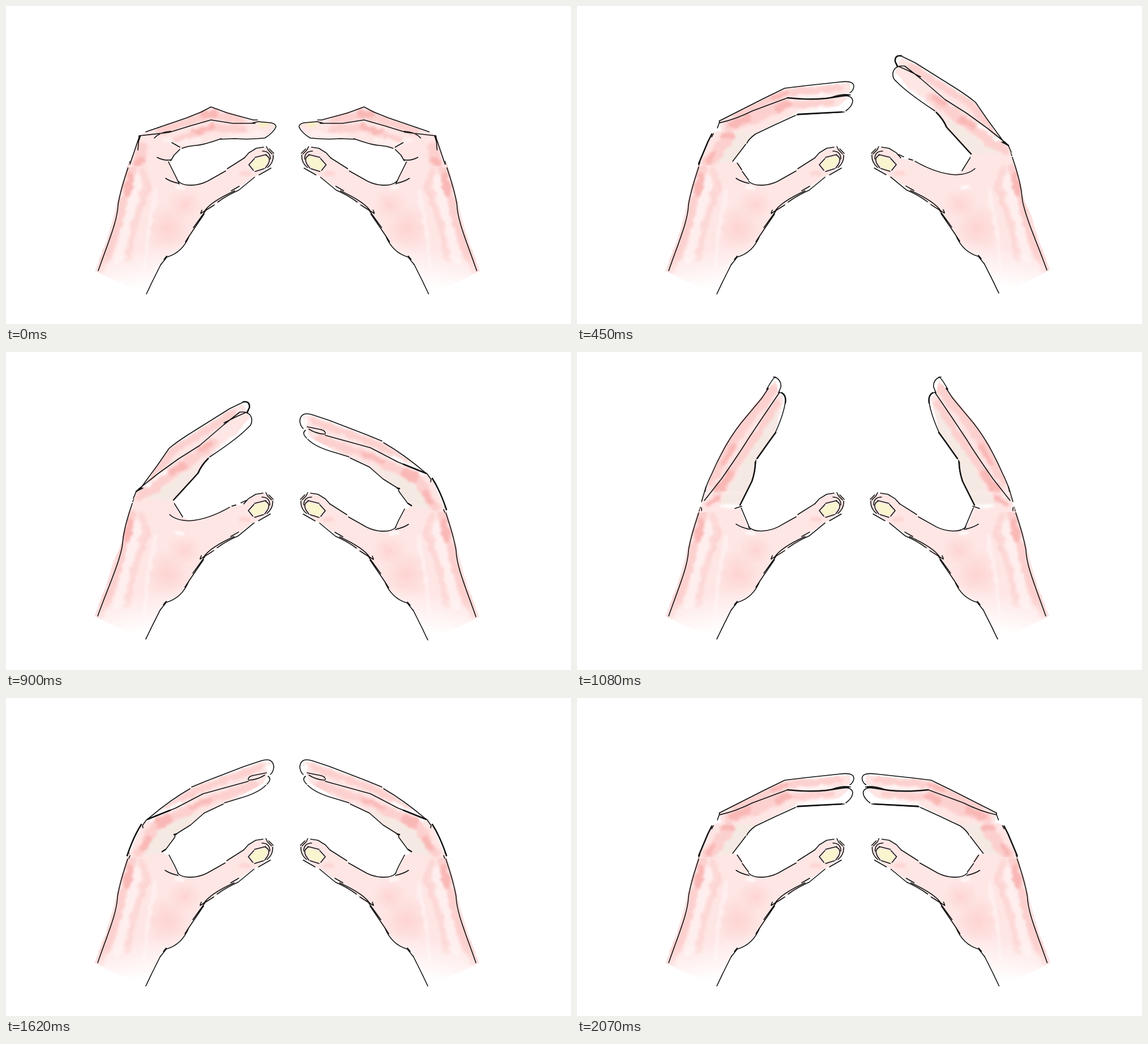
An HTML page for the animation above (2160 ms loop, 998 by 561 pixels).

```html
<!DOCTYPE html>
<html lang="en">
<head>
<meta charset="utf-8">
<title>Two hands</title>
<style>
html, body { margin: 0; width: 100%; height: 100%; overflow: hidden; background: #fff; }
svg { display: block; width: 100%; height: 100%; }
.ink { fill: none; stroke: #111; stroke-width: 1.6; stroke-linecap: round; stroke-linejoin: round; }
.bold { stroke-width: 2.5; }
</style>
</head>
<body>
<svg viewBox="0 0 998 561">
  <defs id="defs"></defs>
  <use id="left"/>
  <use id="right"/>
</svg>
<script>
const BASE = '#fee6e5', MID = '#fcd0ce', DEEP = '#f9b8b6', PALE = '#feefee', BEIGE = '#f5e9e3', BLUSH = 'url(#blush)';

// A wash is [colour, stroke width (0 = filled shape), path].
const wash = ([color, width, d]) => width
  ? `<path d="${d}" fill="none" stroke="${color}" stroke-width="${width}" stroke-linecap="round" stroke-linejoin="round"/>`
  : `<path d="${d}" fill="${color}"/>`;
const ink = (d, bold = '') => `<path class="ink ${bold}" d="${d}"/>`;

// Shared from the thumb tip round to the wrist.
const thumbSkin = 'L421 268 Q437 250 458 250 Q476 258 473 270 Q468 284 436 304 Q395 330 372 348 ' +
  'L350 366 L322 411 Q308 434 284 444 L274 455 L248 508 L182 480 L157 467 Q182 405 190 370 ';
const low = {
  skin: `M217 277 L288 277 L306 314 Q330 319 356 309 L390 288 ${thumbSkin} L198 340 Q206 300 217 277Z`,
  edge: 'M219 274 L217 281 M216 284 C209 306 202 325 198 350 C197 378 183 410 163 467',
  web: 'M282 304 Q291 310 305 313 M304 309 C315 320 340 317 356 309 L388 291 M391 287 L421 268'
};
const high = {
  skin: `M226 262 L295 262 L312 291 Q330 301 355 292 L396 274 ${thumbSkin} L203 345 Q210 300 226 262Z`,
  edge: 'M227 259 L225 264 M224 267 C213 300 208 320 206 345 C199 378 183 412 163 467',
  web: 'M295 262 L313 291 M290 287 Q302 298 325 298 Q358 296 396 274 M400 272 L407 270 M416 266 L425 262'
};

const thumbInk = 'M421 268 L429 259 L442 251 L455 249 M460 248 L463 254 L470 261 M465 252 L473 260 ' +
  'M472 263 Q473 276 462 285 M453 256 Q467 256 467 270 M437 290 L429 280 L439 269 M440 267 L460 262 ' +
  'M459 263 Q469 268 463 279 L458 286 M440 292 L456 287 M447 298 L468 286 M439 302 L411 325 Q390 334 374 346 ' +
  'M398 326 L412 318 M404 326 Q360 346 350 363 M344 365 L346 360 M344 366 L368 351 ' +
  'M352 362 L331 391 M350 367 L324 405 L317 416 M324 405 Q312 435 284 443 L273 457 ' +
  'M279 447 L284 441 M274 455 L259 485 L248 508 M259 485 L256 491';

const palmWash = [
  [PALE, 14, 'M234 305 Q226 340 213 385 L198 450'],
  [MID, 15, 'M223 286 Q207 345 201 375 Q190 420 164 466'],
  [DEEP, 13, 'M220 300 L214 330'],
  ['#fcd8d6', 11, 'M240 288 Q247 305 248 318 Q240 335 241 345 L226 390 L214 448'],
  [MID, 3, 'M252 310 L253 325 L245 338 L245 352 L239 366'],
  [BLUSH, 0, 'M245 392 A40 42 0 1 1 325 392 A40 42 0 1 1 245 392Z'],
  [BLUSH, 0, 'M288 350 A28 26 0 1 1 344 350 A28 26 0 1 1 288 350Z'],
  [PALE, 7, 'M264 325 Q262 345 250 405 L244 460'],
  ['#fdd5d3', 8, 'M417 298 L427 294'],
  ['#fff', 5, 'M301 319 L315 321']
];

// "fit" aligns the palm with the fingers; "mirror" is the width the right hand is reflected in.
const poses = [
  {
    palm: low, mirror: 994.5, fit: 'translate(0)',
    skin: 'M247 222 L320 197 L362 178 L437 201 L470 206 L477 213 L457 233 L378 235 L335 246 L307 253 L289 273 L291 284 L216 284 L235 229Z',
    wash: [
      [MID, 15, 'M275 219 L362 191 L415 202'], [DEEP, 14, 'M350 191 L367 190'],
      [MID, 13, 'M300 238 L362 215 L420 218'], [DEEP, 9, 'M335 222 L365 213'],
      [PALE, 9, 'M295 244 L340 237 M400 230 L455 226'],
      [MID, 20, 'M240 250 L236 275'], [DEEP, 12, 'M238 272 L230 278'], [PALE, 8, 'M280 235 L290 239'],
      ['#f6f1bd', 6, 'M449 209 L461 208']
    ],
    ink: 'M247 222 L320 197 L345 187 L362 178 L392 189 L437 201 L444 201 M235 229 L288 223 L327 211 L362 201 L400 207 L440 207 ' +
      'M433 207 L445 204 L468 206 Q477 208 477 213 Q472 224 457 233 Q430 236 404 234 L378 235 ' +
      'M380 234 Q350 245 335 246 Q321 247 311 251 M262 233 Q272 222 291 221 M235 229 L233 254 M236 229 L219 279 ' +
      'M293 241 L307 249 M307 253 L297 263 L291 273 M267 267 Q280 274 292 271 M287 275 L300 301 L306 314',
    bold: 'M237 229 L234 238'
  },
  {
    palm: low, mirror: 992.5, fit: 'translate(-1)',
    skin: 'M252 203 L330 163 L368 146 L480 136 L484 150 L465 157 L480 162 L460 178 L388 188 L314 226 L301 241 L276 274 L289 281 L215 281 L238 225 L254 218Z',
    wash: [
      [MID, 12, 'M280 193 L368 154 L465 144'], [DEEP, 8, 'M345 162 L370 154'],
      [MID, 20, 'M270 211 L372 173'], [DEEP, 13, 'M275 209 L300 199 M355 180 L375 173'],
      [MID, 10, 'M385 174 L450 170'],
      [BEIGE, 0, 'M258 221 L314 223 L301 241 L276 275 L232 278 Q250 252 258 221Z'],
      [MID, 22, 'M268 230 Q255 252 232 275'], [DEEP, 10, 'M256 229 L276 229 M241 260 L232 274'],
      ['#fff', 4, 'M390 159 L450 157 M390 186 L450 181']
    ],
    ink: 'M251 203 L330 163 L367 145 L400 141 L465 134 Q489 131 489 142 Q488 150 482 153 M252 206 Q280 200 310 185 L372 162 ' +
      'M450 161 Q470 154 483 157 M465 159 Q487 156 487 168 Q486 177 475 185 M388 192 L472 187 ' +
      'M386 193 Q350 209 315 226 Q303 235 300 242 M252 204 L248 215 M241 225 L238 231 M298 244 L275 274 ' +
      'M283 277 L291 289 M292 292 L303 307 M217 276 L215 281',
    bold: 'M372 162 Q410 166 440 163 L480 157 M390 191 L468 187 M238 226 L231 240 L215 278'
  },
  {
    palm: low, mirror: 992, fit: 'translate(-1)',
    skin: 'M250 214 L326 158 L450 113 L468 114 L462 132 L456 150 L412 174 L384 186 L350 203 L326 224 L300 241 L276 272 L289 281 L215 281 L240 224Z',
    wash: [
      [MID, 11, 'M275 200 L335 164 L450 122'], [MID, 15, 'M270 222 L355 182 L440 153'],
      [DEEP, 18, 'M264 225 L285 214'], [DEEP, 7, 'M325 193 L360 179'],
      [BEIGE, 0, 'M258 240 L320 207 L348 199 L326 222 L300 241 L276 273 L234 278Z'],
      [MID, 16, 'M260 226 Q252 252 233 274'], [DEEP, 12, 'M251 251 L243 265'],
      ['#fff', 8, 'M253 211 L308 186 M460 120 L464 126']
    ],
    ink: 'M251 213 Q290 180 325 160 M328 157 L355 146 L420 121 L450 111 Q472 104 473 122 Q472 131 467 135 ' +
      'M248 215 L300 194 L348 169 L428 147 M428 144 Q427 138 440 136 L460 132 M429 145 Q445 144 457 136 ' +
      'M463 138 Q470 143 461 152 M459 154 Q445 168 412 177 L386 185 M384 187 L350 203 L326 224 L302 239 ' +
      'M248 215 L241 225 L242 229 M299 241 L298 246 L283 266 M288 277 L298 296 L304 309 M219 278 L217 283',
    bold: 'M250 214 L290 198 M239 223 Q225 245 214 278 M297 241 L301 240 M282 267 L276 271'
  },
  {
    palm: high, mirror: 992, fit: 'translate(-1 1.5) scale(1 .994)',
    skin: 'M240 240 L290 169 L395 102 L420 92 L426 105 L430 116 L405 147 L358 186 L338 214 L296 262 L296 272 L223 272 L229 247Z',
    wash: [
      [MID, 13, 'M255 224 L295 174 L402 108'],
      [MID, 18, 'M248 247 L295 213 L350 173 L365 161'], [DEEP, 10, 'M292 213 L312 199 M345 172 L362 160'],
      [BEIGE, 0, 'M295 228 L342 193 L337 214 L296 262 L245 259Z'],
      [MID, 16, 'M236 254 L265 240'], ['#fff', 5, 'M250 236 L282 211 M372 174 L402 151']
    ],
    ink: 'M238 240 L268 199 L288 170 Q300 160 320 147 L395 100 L420 88 Q430 86 430 98 L427 106 ' +
      'M234 242 L268 215 L304 189 L342 165 L385 128 L413 106 Q431 104 434 118 Q435 128 428 133 Q410 152 360 185 ' +
      'M358 187 Q345 199 340 213 M385 125 L407 114 L423 107 M242 240 L230 246 L225 258',
    bold: 'M419 88 Q431 86 430 98 L426 106 M357 188 Q345 200 339 214 L296 261 M230 246 L239 239'
  },
  {
    palm: low, mirror: 990, fit: 'translate(-1 1.5) scale(1 .994)',
    skin: 'M222 261 L235 220 L262 163 L290 122 L337 66 L351 50 L356 72 L365 82 L350 143 L318 188 L309 228 L288 272 L291 282 L217 282Z',
    wash: [
      [MID, 19, 'M235 228 L268 168 L300 121 L344 67'], [DEEP, 11, 'M259 195 L277 166'],
      [BEIGE, 0, 'M361 91 L350 143 L318 188 L309 228 L289 269 L252 269 L320 150Z'],
      [MID, 14, 'M244 251 L287 190 L322 139 L351 92'], [DEEP, 15, 'M248 245 L271 216'],
      ['#fff', 6, 'M256 271 L285 273'], [DEEP, 9, 'M232 268 L250 258'],
      [PALE, 3, 'M228 249 L296 249']
    ],
    ink: 'M226 246 Q228 235 238 215 Q262 160 290 125 L326 82 L338 64 M335 66 Q345 48 350 44 Q362 51 360 62 L356 72 ' +
      'M225 262 L255 224 Q286 180 302 154 L328 115 L358 71 Q370 74 368 88 Q365 110 350 143 Q335 164 319 187 ' +
      'M316 191 Q315 210 309 228 M228 237 L220 264 M220 275 L220 280 M279 276 L291 272 M290 275 L306 313 M347 44 L353 46',
    bold: 'M362 72 Q370 77 368 90 M351 142 L340 157 L318 188 M315 194 Q315 210 309 228 L288 270'
  }
];

const hand = ({ palm, skin, wash: tint, ink: lines, bold, fit }, i) => `
  <clipPath id="palm${i}"><path d="${palm.skin}"/></clipPath>
  <clipPath id="fingers${i}"><path d="${skin}"/></clipPath>
  <g id="hand${i}">
    <g transform="${fit}">
      <g mask="url(#fade)" filter="url(#edge)">
        <path d="${palm.skin}" fill="${BASE}"/>
        <g clip-path="url(#palm${i})"><g filter="url(#soft)">${palmWash.map(wash).join('')}</g></g>
      </g>
      <path d="M432 280 L441 270 L459 265 L464 271 L455 285 L440 290Z" fill="#f9f5cf"/>
      ${ink(thumbInk)}${ink(palm.edge + palm.web)}
    </g>
    <g filter="url(#edge)">
      <path d="${skin}" fill="${BASE}"/>
      <g clip-path="url(#fingers${i})"><g filter="url(#soft)">${tint.map(wash).join('')}</g></g>
    </g>
    ${ink(lines)}${ink(bold, 'bold')}
  </g>`;

const area = 'filterUnits="userSpaceOnUse" x="0" y="0" width="998" height="561" color-interpolation-filters="sRGB"';
const rough = (blur, size) => `
  <feTurbulence type="fractalNoise" baseFrequency=".08" numOctaves="2" seed="4" result="noise"/>
  <feDisplacementMap in="SourceGraphic" in2="noise" scale="${size}" xChannelSelector="R" yChannelSelector="G"/>
  <feGaussianBlur stdDeviation="${blur}"/>`;

const get = id => document.getElementById(id);
get('defs').innerHTML = `
  <filter id="soft" ${area}>${rough(2, 9)}</filter>
  <filter id="edge" ${area}>${rough(.7, 3)}</filter>
  <radialGradient id="blush">
    <stop stop-color="#fdd3d1"/><stop offset="1" stop-color="#fdd3d1" stop-opacity="0"/>
  </radialGradient>
  <linearGradient id="down" gradientUnits="userSpaceOnUse" x1="215" y1="430" x2="228" y2="500">
    <stop stop-color="#fff"/><stop offset="1" stop-color="#000"/>
  </linearGradient>
  <mask id="fade" maskUnits="userSpaceOnUse" x="0" y="0" width="998" height="561">
    <rect width="998" height="561" fill="url(#down)"/>
  </mask>` + poses.map(hand).join('');

// The right hand opens and closes three times while the left does so once.
const rightPose = n => 4 - Math.abs(4 - n % 8);
const leftPose = n => n < 12 ? Math.max(0, Math.floor((n - 1) / 3)) : 8 - Math.floor(n / 3);

let shown = -1;
function draw(time) {
  const n = Math.floor(time / 90) % 24;
  if (n !== shown) {
    shown = n;
    const r = rightPose(n);
    get('left').setAttribute('href', '#hand' + leftPose(n));
    get('right').setAttribute('href', '#hand' + r);
    get('right').setAttribute('transform', `translate(${poses[r].mirror}) scale(-1 1)`);
  }
  requestAnimationFrame(now => draw(Math.max(0, now - start)));
}
const start = performance.now();
draw(0);
</script>
</body>
</html>
```
